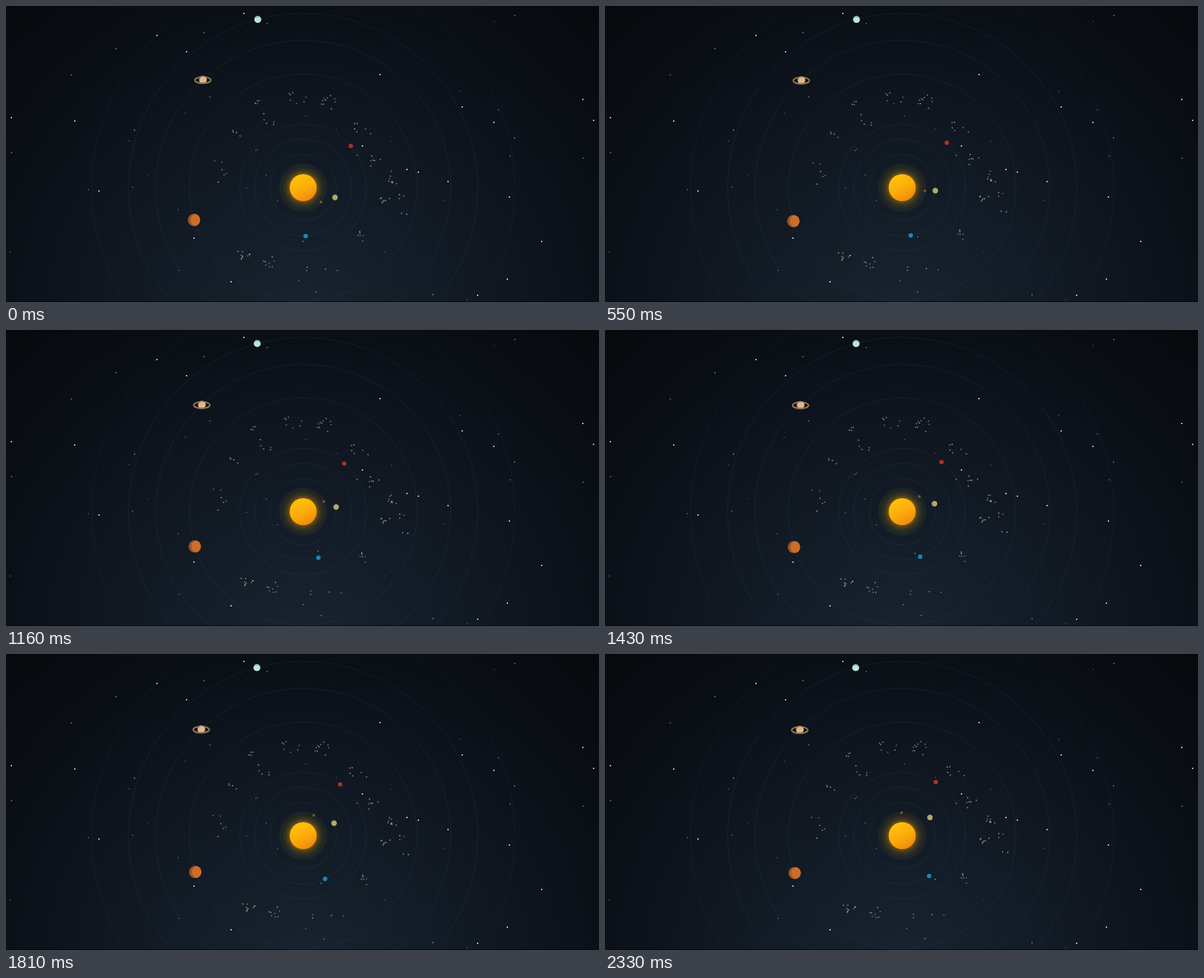
Write an HTML page with a canvas that moves like this. It is 880 by 440 pixels and loops after 2.43 s.

```html
<!DOCTYPE html>
<html lang="en">
<head>
<meta charset="utf-8">
<title>Solar system</title>
<style>
  html, body { margin: 0; width: 100%; height: 100%; overflow: hidden; background: #090c12; }
  canvas { display: block; width: 880px; height: 440px; }
</style>
</head>
<body>
<canvas id="stage" width="880" height="440"></canvas>
<script>
const W = 880, H = 440, LOOP = 2430, LAST = 2330;
const SUN = { x: 441, y: 270 };
const TAU = Math.PI * 2;
const rad = deg => deg * Math.PI / 180;

// start angle in degrees and anticlockwise speed in degrees per ms
const PLANETS = {
  mercury: { r: 34, start: 39, speed: 0.0561 },
  venus: { r: 49.2, start: 17.1, speed: 0.02167 },
  earth: { r: 72.1, start: 87.1, speed: 0.01322 },
  mars: { r: 94, start: -41.3, speed: 0.00721 },
  jupiter: { r: 169, start: 163.5, speed: 0.00116 },
  saturn: { r: 219, start: 227.17, speed: 0.00048 },
  uranus: { r: 259.2, start: 254.93, speed: 0.00016 }
};
const OUTER_ORBIT = 314;
const BELT_SPEED = 0.00232;

// brightest stars
const STARS = [
  [8, 166], [102, 171], [138, 275], [224, 44], [268, 68], [279, 345], [334, 410],
  [353, 11], [555, 102], [677, 150], [724, 173], [856, 139], [872, 170], [656, 261],
  [595, 243], [612, 247], [529, 208], [747, 284], [795, 350], [744, 406], [700, 430]
];

// asteroid clusters: x, y, size, spread
const CLUSTERS = [
  [480, 141, 10, 13], [432, 134, 7, 14], [376, 145, 4, 7], [388, 173, 5, 14],
  [340, 191, 4, 9], [316, 245, 6, 17], [526, 183, 6, 17], [547, 231, 6, 9],
  [574, 255, 8, 11], [560, 290, 6, 6], [578, 300, 6, 22], [525, 343, 6, 8],
  [353, 367, 9, 10], [391, 380, 8, 9], [460, 394, 6, 32]
];

function seeded(seed) {
  return () => (seed = seed * 16807 % 2147483647) / 2147483647;
}

const ctx = document.getElementById('stage').getContext('2d');

function disc(c, x, y, r, fill) {
  c.fillStyle = fill;
  c.beginPath();
  c.arc(x, y, r, 0, TAU);
  c.fill();
}

function ring(c, r, color) {
  c.strokeStyle = color;
  c.beginPath();
  c.arc(SUN.x, SUN.y, r, 0, TAU);
  c.stroke();
}

function fade(gradient, ...colors) {
  colors.forEach((color, i) => gradient.addColorStop(i / (colors.length - 1), color));
  return gradient;
}

function place({ r, start, speed }, t) {
  const a = rad(start - speed * t);
  return { x: SUN.x + r * Math.cos(a), y: SUN.y + r * Math.sin(a) };
}

function makeBelt() {
  const rand = seeded(4177);
  return CLUSTERS.flatMap(([x, y, count, spread]) => Array.from({ length: count }, () => {
    const a = rand() * TAU, d = Math.sqrt(rand()) * spread;
    const dx = x + d * Math.cos(a) - SUN.x, dy = y + d * Math.sin(a) - SUN.y;
    return {
      r: Math.hypot(dx, dy),
      start: Math.atan2(dy, dx) * 180 / Math.PI,
      speed: BELT_SPEED,
      light: 0.4 + 0.3 * rand()
    };
  }));
}

function paintSky() {
  const sky = document.createElement('canvas');
  sky.width = W;
  sky.height = H;
  const c = sky.getContext('2d');

  c.fillStyle = fade(c.createRadialGradient(440, 470, 0, 440, 470, 640),
    '#18242f', '#131d28', '#0f1620', '#0a0f16', '#07090d');
  c.fillRect(0, 0, W, H);
  c.fillStyle = '#05070a';
  c.fillRect(0, 0, W, 1);
  c.fillRect(0, H - 1, W, 1);

  for (const { r } of Object.values(PLANETS)) ring(c, r, 'rgba(70, 95, 120, 0.18)');
  ring(c, OUTER_ORBIT, 'rgba(70, 95, 120, 0.13)');

  STARS.forEach(([x, y]) => disc(c, x, y, 1.05, '#eef1f4'));
  const rand = seeded(911);
  for (let i = 0; i < 36; i++) {
    disc(c, rand() * W, rand() * H, 0.9, `rgba(220, 226, 232, ${0.25 + 0.45 * rand()})`);
  }

  disc(c, SUN.x, SUN.y, 38, fade(c.createRadialGradient(SUN.x, SUN.y, 18, SUN.x, SUN.y, 38),
    'rgba(235, 150, 10, 0.6)', 'rgba(160, 115, 15, 0.32)',
    'rgba(110, 95, 20, 0.16)', 'rgba(90, 85, 25, 0)'));
  disc(c, SUN.x, SUN.y, 20, fade(c.createLinearGradient(432, 252, 450, 288),
    '#ffc108', '#fcae0b', '#f08b10'));
  return sky;
}

// disc with an offset lighter face clipped to its edge
function shaded(p, r, base, face, dx, dy) {
  disc(ctx, p.x, p.y, r, base);
  ctx.save();
  ctx.beginPath();
  ctx.arc(p.x, p.y, r, 0, TAU);
  ctx.clip();
  disc(ctx, p.x + dx, p.y + dy, r, face);
  ctx.restore();
}

function drawSaturn(p) {
  const half = (from, to) => {
    ctx.beginPath();
    ctx.ellipse(p.x, p.y + 0.8, 11.9, 4.7, 0, from, to);
    ctx.fill();
    ctx.stroke();
  };
  ctx.strokeStyle = '#8a734d';
  ctx.fillStyle = '#0a0d11';
  ctx.lineWidth = 2.2;
  half(0, TAU);
  shaded(p, 5.8, '#a88465', '#e0b88f', 0.8, 1.6);
  ctx.fillStyle = 'transparent';
  half(rad(20), rad(160));
}

function drawEarth(p, t) {
  const a = rad(122 - 0.192 * t);
  disc(ctx, p.x + 1 + 9.7 * Math.cos(a), p.y - 0.5 + 9.7 * Math.sin(a), 1, '#7d838a');
  disc(ctx, p.x, p.y, 3.3, '#1a86bd');
}

const sky = paintSky();
const belt = makeBelt();

function draw(t) {
  const at = name => place(PLANETS[name], t);
  ctx.drawImage(sky, 0, 0);
  for (const rock of belt) {
    const { x, y } = place(rock, t);
    disc(ctx, x, y, 1, `rgba(215, 220, 225, ${rock.light})`);
  }

  const mercury = at('mercury');
  disc(ctx, mercury.x, mercury.y, 2.1, '#75562a');
  shaded(at('venus'), 4.2, '#85824f', '#b0ab6b', 0.9, 0.2);
  drawEarth(at('earth'), t);
  shaded(at('mars'), 3.2, '#8e2722', '#b03028', 0.4, 0.4);
  shaded(at('jupiter'), 9.2, '#97542b', '#cb6e2c', 4, 0);
  drawSaturn(at('saturn'));
  shaded(at('uranus'), 5.2, '#8abab7', '#bfe3df', 0, 2);
}

const begin = performance.now();

function tick() {
  draw(Math.min((performance.now() - begin) % LOOP, LAST));
  requestAnimationFrame(tick);
}
tick();
</script>
</body>
</html>
```
